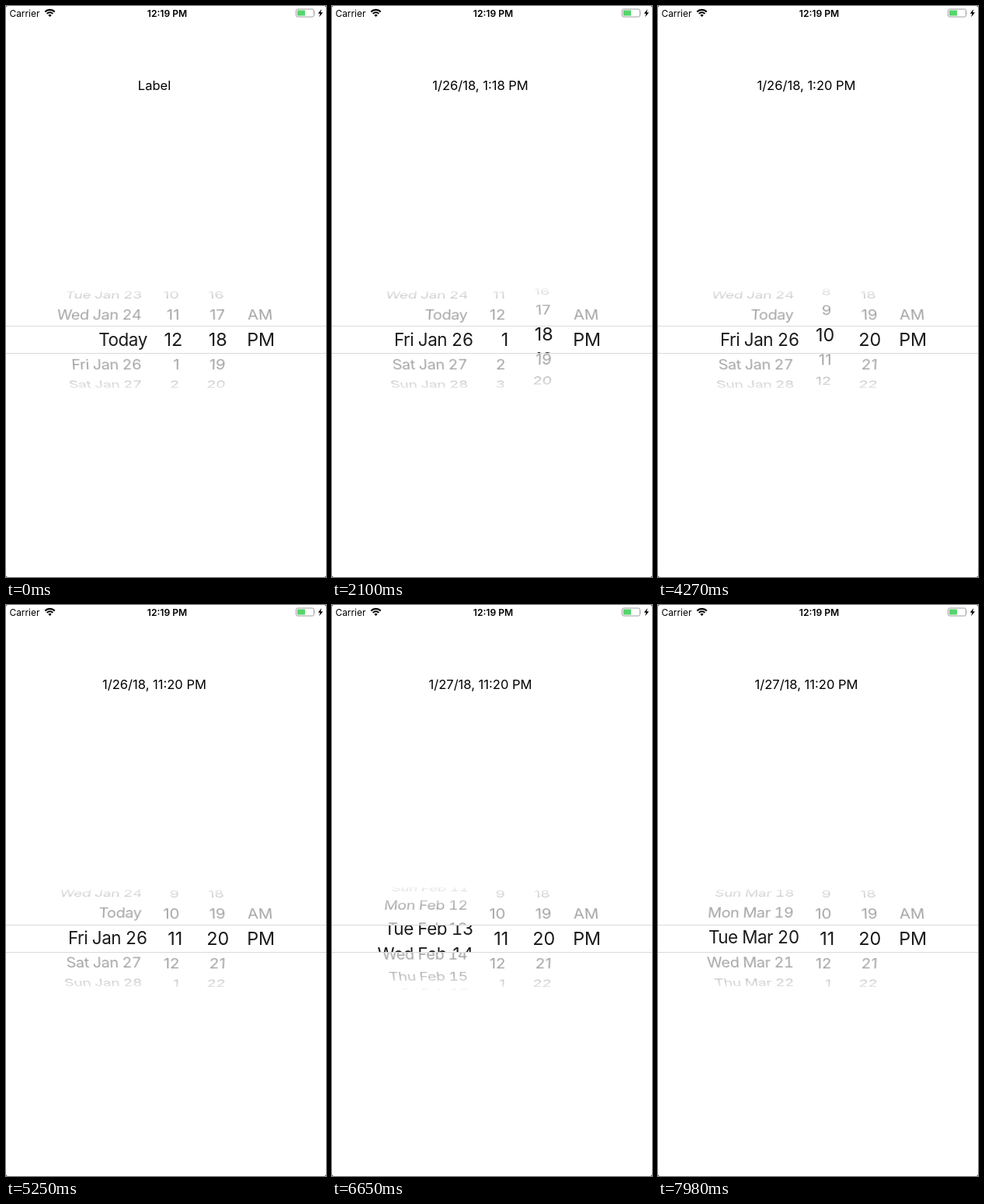
Recreate the animation shown at these times as an HTML page. Size 412x734 px, loop 8000 ms.

```html
<!DOCTYPE html>
<html lang="en">
<head>
<meta charset="utf-8">
<title>Date picker</title>
<style>
html, body { margin: 0; width: 100%; height: 100%; overflow: hidden; background: #000; }
#stage {
  position: relative; width: 412px; height: 734px; overflow: hidden;
  background: #fff; border-radius: 2px; color: #000;
  font-family: Inter, Roboto, "Liberation Sans", sans-serif;
}
#stage > *, .row { position: absolute; white-space: nowrap; }
.status { top: 2px; line-height: 15px; }
#carrier { left: 4.5px; font-size: 11.9px; }
#clock { left: 107.5px; width: 200px; text-align: center; font-size: 12.1px; font-weight: 600; }
#icons { left: 0; top: 0; }
#label { left: 91px; top: 92px; width: 200px; line-height: 21px; text-align: center; font-size: 16.55px; }
#wheel {
  left: 0; top: 363px; width: 412px; height: 132px; overflow: hidden;
  color: #a4a4a4; perspective: 700px;
  -webkit-mask-image: linear-gradient(rgba(0,0,0,.2), #000 26px, #000 calc(100% - 26px), rgba(0,0,0,.2));
  mask-image: linear-gradient(rgba(0,0,0,.2), #000 26px, #000 calc(100% - 26px), rgba(0,0,0,.2));
}
#band {
  left: 0; top: 411px; width: 412px; height: 36px; box-sizing: border-box; overflow: hidden;
  background: #fff; border: solid #dadada; border-width: 1px 0; color: #1b1b1b;
}
.row { left: 0; height: 30px; line-height: 30px; text-align: right; }
.day { letter-spacing: -.02em; font-variant-numeric: tabular-nums; }
#wheel .row { top: 51px; }
#band .row { top: 2px; }
</style>
</head>
<body>
<div id="stage">
  <div id="carrier" class="status">Carrier</div>
  <div id="clock" class="status">12:19 PM</div>
  <svg id="icons" width="412" height="20">
    <g fill="none" stroke="#000" stroke-width="2.1">
      <path d="M50.3 7.5a8.6 8.6 0 0 1 12.4 0"/>
      <path d="M52.7 9.9a5.2 5.2 0 0 1 7.6 0"/>
    </g>
    <path d="M56.5 14.1l-2.2-2.3a3.1 3.1 0 0 1 4.4 0z"/>
    <rect x="373.5" y="4" width="23" height="10" rx="2" fill="none" stroke="#a0a0a0"/>
    <rect x="375" y="5.5" width="10" height="7" rx=".6" fill="#56d66b"/>
    <path d="M397.6 7.2q1.3 1.8 0 3.6z" fill="#a0a0a0"/>
    <path d="M406.2 4l-4.4 5.8h2.6l-1.2 4.4 4.8-6h-2.8z"/>
  </svg>
  <div id="label">Label</div>
  <div id="wheel"></div>
  <div id="band"></div>
</div>
<script>
const LOOP = 8000, STEP = 70;
const RADIUS = 83, ROW_ANGLE = 22.9, BAND_PITCH = 32.5;
const DAYS = 'Sun Mon Tue Wed Thu Fri Sat'.split(' ');
const MONTHS = ['Jan', 'Feb', 'Mar', 'Apr'];
const TODAY = 25;
const $ = id => document.getElementById(id);

// Days are counted from January 1, 2018.
function dayText(n) {
  if (n === TODAY) return 'Today';
  const d = new Date(Date.UTC(2018, 0, n));
  return `${DAYS[d.getUTCDay()]} ${MONTHS[d.getUTCMonth()]} ${d.getUTCDate()}`;
}
const hourText = n => String((n - 1) % 12 + 1);
const minuteText = n => String((n + 60) % 60).padStart(2, '0');
const halfText = n => ['AM', 'PM'][n] || '';

// right and size: on the wheel, in the band; keys: [time, row]
const columns = [
  { text: dayText, style: 'day', right: [174.2, 181.8], size: [20, 22.4],
    keys: [[0, 25], [70, 25.08], [280, 25.6], [560, 26], [5180, 26], [5460, 26.4], [5880, 27], [6020, 27],
           [6300, 31], [6650, 44.39], [7100, 61], [7500, 73], [7980, 79.05]] },
  { text: hourText, right: [223.6, 227.2], size: [20.6, 23.4],
    keys: [[1050, 12], [1400, 13], [2940, 13], [3010, 13.04], [3300, 15], [3780, 19], [4270, 22.2], [4900, 23]] },
  { text: minuteText, center: 272.8, size: [20.6, 23.4],
    keys: [[2030, 18], [2170, 18.6], [2450, 20]] },
  { text: halfText, center: 328.2, size: [20.6, 23.4], keys: [[0, 1]] }
];

const labels = [
  [0, 'Label'], [630, '1/26/18, 12:18 PM'], [1470, '1/26/18, 1:18 PM'],
  [2450, '1/26/18, 1:20 PM'], [5040, '1/26/18, 11:20 PM'], [5950, '1/27/18, 11:20 PM']
];

// Monotone cubic through the keys, at rest on both ends.
function valueAt(keys, t) {
  const last = keys.length - 1;
  if (t <= keys[0][0]) return keys[0][1];
  if (t >= keys[last][0]) return keys[last][1];
  const i = keys.findIndex(k => k[0] > t) - 1;
  const rate = j => (keys[j + 1][1] - keys[j][1]) / (keys[j + 1][0] - keys[j][0]);
  const slope = j => {
    if (j === 0 || j === last) return 0;
    const a = rate(j - 1), b = rate(j);
    return a * b > 0 ? 2 * a * b / (a + b) : 0;
  };
  const [t0, v0] = keys[i], [t1, v1] = keys[i + 1];
  const h = t1 - t0, s = (t - t0) / h, r = 1 - s;
  return v0 * r * r * (1 + 2 * s) + v1 * s * s * (3 - 2 * s)
    + h * s * r * (r * slope(i) - s * slope(i + 1));
}

function makeRows(parent, col, layer, reach) {
  return Array.from({ length: 2 * reach + 1 }, (_, i) => {
    const el = document.createElement('div');
    el.className = `row ${col.style || ''}`;
    el.style.fontSize = col.size[layer] + 'px';
    if (col.center) {
      el.style.width = 2 * col.center + 'px';
      el.style.textAlign = 'center';
    } else {
      el.style.width = col.right[layer] + 'px';
    }
    parent.append(el);
    return { el, offset: i - reach };
  });
}

for (const col of columns) {
  col.wheel = makeRows($('wheel'), col, 0, 3);
  col.band = makeRows($('band'), col, 1, 1);
}

function setText(el, text) {
  if (el.textContent !== text) el.textContent = text;
}

const onWheel = u =>
  `translateZ(${-RADIUS}px) rotateX(${-u * ROW_ANGLE}deg) translateZ(${RADIUS}px)`;
const inBand = u => `translateY(${u * BAND_PITCH}px)`;

function draw(t) {
  for (const col of columns) {
    const v = valueAt(col.keys, t), mid = Math.round(v);
    const place = (rows, move) => rows.forEach(({ el, offset }) => {
      setText(el, col.text(mid + offset));
      el.style.transform = move(mid + offset - v);
    });
    place(col.wheel, onWheel);
    place(col.band, inBand);
  }
  setText($('label'), labels.filter(l => l[0] <= t).pop()[1]);
}

const start = performance.now();
function tick() {
  const t = (performance.now() - start) % LOOP;
  draw(Math.floor(t / STEP) * STEP);
  requestAnimationFrame(tick);
}
draw(0);
requestAnimationFrame(tick);
</script>
</body>
</html>
```
